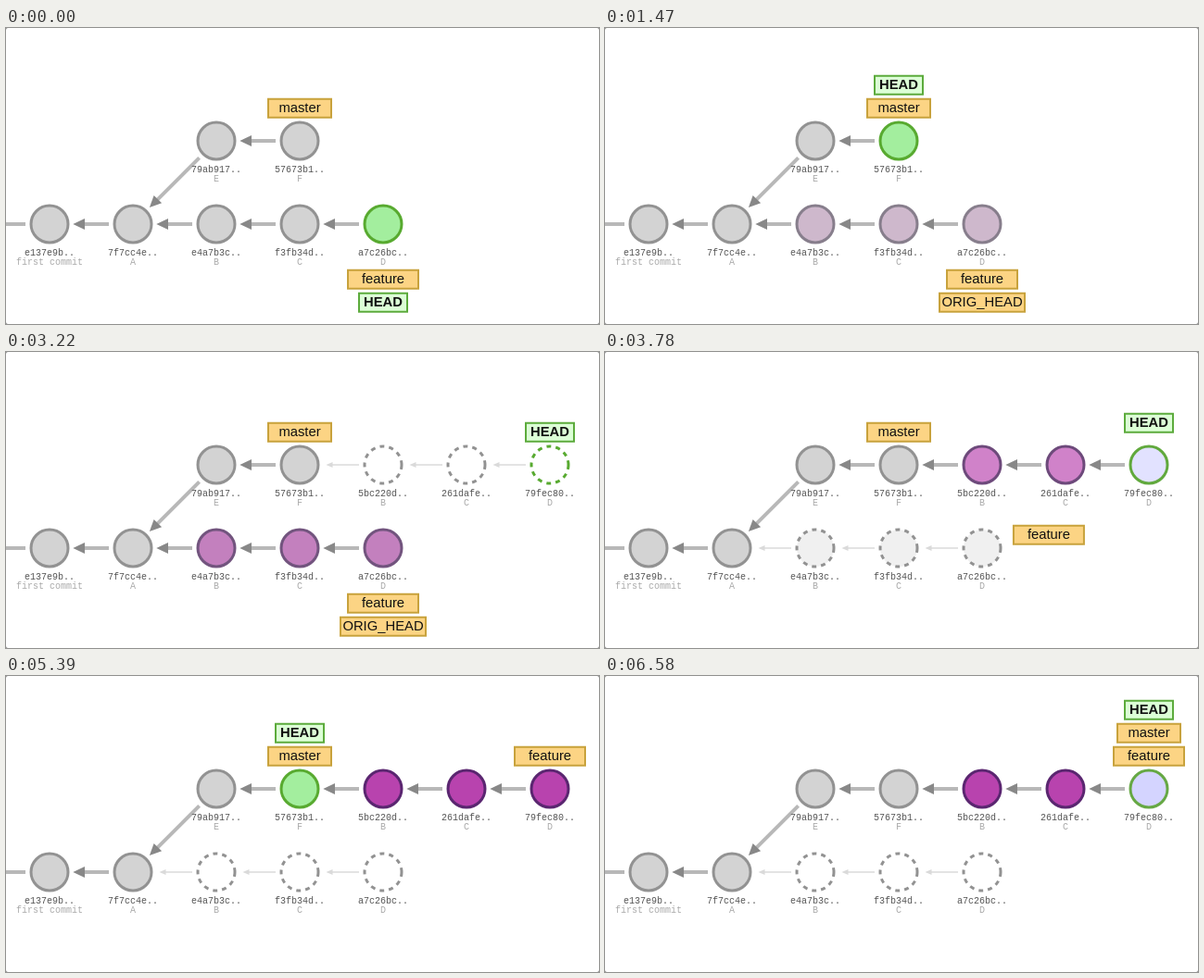
Write an HTML page with a canvas that moves like this. It is 640 by 320 pixels and loops after 6.65 s.

```html
<!DOCTYPE html>
<html lang="en">
<head>
<meta charset="utf-8">
<title>Rebase and fast-forward</title>
<style>
html, body { margin: 0; width: 100%; height: 100%; overflow: hidden; background: #fff; }
canvas { display: block; }
</style>
</head>
<body>
<canvas id="stage" width="640" height="320"></canvas>
<script>
const ctx = document.getElementById('stage').getContext('2d');
const LOOP = 6650, MOVE = 500, FADE = 600;

// Times at which each action starts
const PUSH = 30, DETACH = 570, MARK = 1380, COPY = 2430, HEAD_ON = 2500,
      UNMARK = 3067, FINISH = 3549, CHECKOUT = 4620, MERGE = 5930;

const GREY = [211, 211, 211], RIM = [146, 146, 146], WHITE = [255, 255, 255],
      GREEN = [163, 238, 158], GREEN_RIM = [88, 170, 48], SOFT_RIM = [102, 168, 68],
      PURPLE = [184, 67, 174], PURPLE_RIM = [90, 38, 112], LAVENDER = [212, 212, 255];

const plain = [GREY, RIM], current = [GREEN, GREEN_RIM], marked = [PURPLE, PURPLE_RIM],
      loose = [WHITE, RIM], looseHead = [WHITE, GREEN_RIM], newHead = [LAVENDER, SOFT_RIM];

const clamp = u => Math.max(0, Math.min(1, u));
const lerp = (a, b, p) => a + (b - a) * p;
const cubic = u => u < .5 ? 4 * u ** 3 : 1 - 4 * (1 - u) ** 3;

// Same curve as the CSS "ease" timing function
function ease(x) {
  let lo = 0, hi = 1, s = x;
  for (let i = 0; i < 18; i++) {
    s = (lo + hi) / 2;
    if (.75 * s * (1 - s) + s ** 3 < x) lo = s; else hi = s;
  }
  return .3 * s * (1 - s) ** 2 + 3 * s * s * (1 - s) + s ** 3;
}

// Walks through [start, values] steps, blending each into the previous value
function follow(first, steps, t, length, curve) {
  let value = first;
  for (const [start, next] of steps) {
    if (t < start) break;
    const p = curve(clamp((t - start) / length));
    value = value.map((v, i) => lerp(v, next[i], p));
  }
  return value;
}

const commit = (x, y, id, note, style = plain, steps = [], extra = {}) =>
  ({ x, y, id, note, style, steps, ...extra });

const oldSteps = [[MARK, marked], [UNMARK, plain], [FINISH, loose]];
const old = { looseFrom: FINISH, looseTo: LOOP };
const copy = { born: COPY, looseFrom: COPY, looseTo: FINISH };
const copySteps = [[HEAD_ON, loose], [FINISH, marked]];

const first = commit(47, 212, 'e137e9b..', 'first commit');
const a = commit(137, 212, '7f7cc4e..', 'A');
const b = commit(227, 212, 'e4a7b3c..', 'B', plain, oldSteps, old);
const c = commit(317, 212, 'f3fb34d..', 'C', plain, oldSteps, old);
const d = commit(407, 212, 'a7c26bc..', 'D', current, [[DETACH, plain], ...oldSteps], old);
const e = commit(227, 122, '79ab917..', 'E');
const f = commit(317, 122, '57673b1..', 'F', plain,
  [[DETACH, current], [COPY, plain], [CHECKOUT, current], [MERGE, plain]]);
const b2 = commit(407, 122, '5bc220d..', 'B', marked, copySteps, copy);
const c2 = commit(497, 122, '261dafe..', 'C', marked, copySteps, copy);
const d2 = commit(587, 122, '79fec80..', 'D', marked,
  [[HEAD_ON, looseHead], [FINISH, newHead], [CHECKOUT, marked], [MERGE, newHead]], copy);

const commits = [first, a, b, c, d, e, f, b2, c2, d2];
const links = [[first, { x: -43, y: 212 }], [a, first], [b, a], [c, b], [d, c],
               [e, a], [f, e], [b2, f], [c2, b2], [d2, c2]];

const tags = [
  { name: 'master', w: 68, at: [317, 87], steps: [[MERGE, [587, 62]]] },
  { name: 'feature', w: 76, at: [407, 272], steps: [[FINISH, [587, 87]]] },
  { name: 'HEAD', w: 52, at: [407, 297], steps: [
    [PUSH, [407, 322]], [DETACH, [317, 62]], [HEAD_ON, [587, 87]],
    [FINISH, [587, 62]], [CHECKOUT, [317, 62]], [MERGE, [587, 37]]] },
  { name: 'ORIG_HEAD', w: 92, at: [407, 297], steps: [], from: PUSH, to: FINISH }
];

const rgb = v => `rgb(${v.map(Math.round)})`;
const isLoose = (n, t) => t >= n.looseFrom && t < n.looseTo;
const growth = (n, t) => n.born ? cubic(clamp((t - n.born) / MOVE)) : 1;

function drawLink(child, parent, t) {
  const thin = isLoose(child, t);
  const dx = parent.x - child.x, dy = parent.y - child.y;
  const full = Math.hypot(dx, dy) - 26 - (thin ? 28.5 : 25.3);
  const tip = lerp(3, full, growth(child, t));
  const head = thin ? 7 : 12.7, half = thin ? 3 : 6;
  ctx.save();
  ctx.translate(child.x, child.y);
  ctx.rotate(Math.atan2(dy, dx));
  ctx.translate(26, 0);
  ctx.lineWidth = thin ? 1.6 : 4;
  ctx.strokeStyle = thin ? '#ddd' : '#b8b8b8';
  ctx.fillStyle = thin ? '#dadada' : '#888';
  if (tip > head) {
    ctx.beginPath();
    ctx.moveTo(0, 0);
    ctx.lineTo(tip - head + 1, 0);
    ctx.stroke();
  }
  ctx.beginPath();
  ctx.moveTo(tip, 0);
  ctx.lineTo(tip - head, -half);
  ctx.lineTo(tip - head, half);
  ctx.fill();
  ctx.restore();
}

function drawCommit(n, t) {
  const [fill, rim] = [0, 1].map(i =>
    follow(n.style[i], n.steps.map(([start, style]) => [start, style[i]]), t, FADE, ease));
  ctx.beginPath();
  ctx.arc(n.x, n.y, lerp(1, 20, growth(n, t)), 0, 2 * Math.PI);
  ctx.fillStyle = rgb(fill);
  ctx.fill();
  ctx.setLineDash(isLoose(n, t) ? [5, 5] : []);
  ctx.lineWidth = 3;
  ctx.strokeStyle = rgb(rim);
  ctx.stroke();
  ctx.setLineDash([]);
}

function drawLabel(n) {
  ctx.font = '10px "Courier New", "Liberation Mono", monospace';
  ctx.fillStyle = '#555';
  ctx.fillText(n.id, n.x, n.y + 34);
  ctx.fillStyle = '#aaa';
  ctx.fillText(n.note, n.x, n.y + 44);
}

function drawTag(tag, t) {
  const [x, y] = follow(tag.at, tag.steps, t, MOVE, cubic);
  const isHead = tag.name === 'HEAD';
  ctx.fillStyle = isHead ? '#dcffd6' : '#fcd484';
  ctx.strokeStyle = isHead ? '#5cab3c' : '#c8a23c';
  ctx.lineWidth = 2;
  ctx.beginPath();
  ctx.rect(x - tag.w / 2, y - 10.3, tag.w, 20);
  ctx.fill();
  ctx.stroke();
  ctx.font = (isHead ? 'bold ' : '') + '14.8px Arial, "Liberation Sans", sans-serif';
  ctx.fillStyle = '#111';
  ctx.fillText(tag.name, x, y + 4);
}

function draw(t) {
  ctx.fillStyle = '#777';
  ctx.fillRect(0, 0, 640, 320);
  ctx.fillStyle = '#fff';
  ctx.beginPath();
  ctx.roundRect(0, 0, 640, 320, 2);
  ctx.fill();
  ctx.textAlign = 'center';
  const alive = n => !n.born || t >= n.born;
  const shown = commits.filter(alive);
  links.filter(([child]) => alive(child)).forEach(([child, parent]) => drawLink(child, parent, t));
  shown.forEach(n => drawCommit(n, t));
  shown.forEach(drawLabel);
  tags.filter(g => t >= (g.from || 0) && t < (g.to || LOOP)).forEach(g => drawTag(g, t));
}

const began = performance.now();
function tick() {
  draw((performance.now() - began) % LOOP);
  requestAnimationFrame(tick);
}
tick();
</script>
</body>
</html>
```
